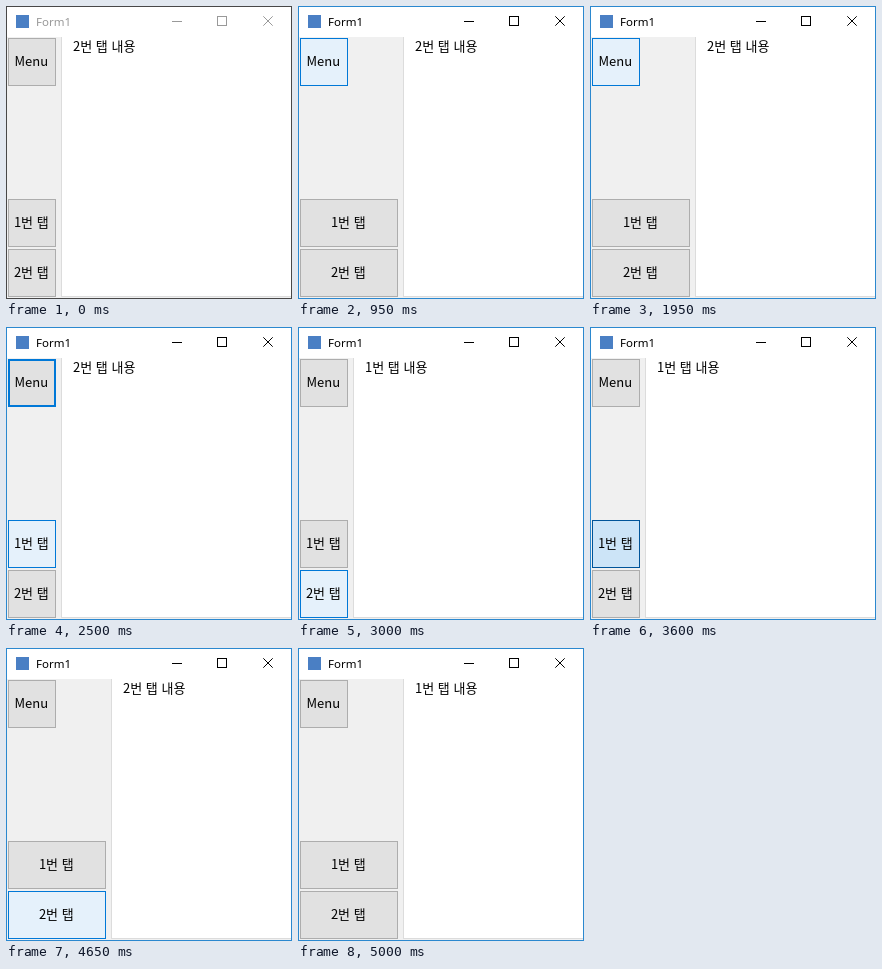
Write an HTML page that moves like this. It is 286 px wide and 293 px high and loops after 5.05 s.

```html
<!DOCTYPE html>
<html lang="ko">
<head>
<meta charset="utf-8">
<title>Form1</title>
<style>
  html, body { margin: 0; width: 100%; height: 100%; overflow: hidden; background: #fff; }
  svg { display: block; }
  text { font: 13px "Noto Sans CJK KR", "Noto Sans CJK", sans-serif; fill: #000; }
  #title { font: 11.5px "Noto Sans", "Noto Sans CJK KR", sans-serif; }
  .button text { text-anchor: middle; }
  .button rect { fill: #e1e1e1; stroke: #adadad; }
  .button .ring { fill: none; stroke: none; }
  .hover .face { fill: #e5f1fb; stroke: #0078d7; }
  .press .face { fill: #cce4f7; stroke: #005499; }
  .focus .face, .focus .ring { stroke: #0078d7; }
  #frame { fill: none; stroke: #2b88cf; }
  #controls { fill: none; stroke: #000; }
  .inactive #frame { stroke: #484848; }
  .inactive #controls { stroke: #999; }
  .inactive #title { fill: #999; }
</style>
</head>
<body>
<svg id="window" width="286" height="293" viewBox="0 0 286 293">
  <rect width="286" height="293" fill="#fff"/>
  <rect x="10" y="9" width="13" height="13" fill="#4a7fc4"/>
  <text id="title" x="30" y="20">Form1</text>
  <g id="controls">
    <path d="M166 15.5h10M211.5 10.5h9v9h-9z" shape-rendering="crispEdges"/>
    <path d="M257.3 10.3l9.4 9.4M266.7 10.3l-9.4 9.4"/>
  </g>
  <rect x="1" y="31" width="284" height="261" fill="#f0f0f0"/>
  <g id="page">
    <rect x="55" y="31" width="230" height="260" fill="#dcdcdc"/>
    <rect x="56" y="31" width="229" height="259" fill="#fff"/>
    <text id="content" x="67" y="45"></text>
  </g>
  <g id="buttons"></g>
  <rect id="frame" x=".5" y=".5" width="285" height="292"/>
</svg>
<script>
const LOOP = 5050;
const $ = id => document.getElementById(id);

// Each step lists only what changes; button looks are '', hover, press or focus.
const steps = [
  [0, { active: false, open: false, tab: 2, menu: '', tab1: '', tab2: '' }],
  [300, { menu: 'hover' }],
  [600, { menu: '' }],
  [750, { menu: 'hover' }],
  [850, { active: true }],
  [900, { menu: 'press' }],
  [950, { menu: 'hover', open: true }],
  [1350, { menu: 'press' }],
  [1400, { menu: 'hover', open: false }],
  [1600, { menu: 'focus' }],
  [1750, { menu: 'hover' }],
  [1900, { menu: 'press' }],
  [1950, { menu: 'hover', open: true }],
  [2250, { menu: 'press' }],
  [2300, { menu: 'hover', open: false }],
  [2450, { menu: 'focus' }],
  [2500, { tab1: 'hover' }],
  [2750, { menu: '', tab1: 'press' }],
  [2800, { tab1: 'hover', tab: 1 }],
  [3000, { tab1: '', tab2: 'hover' }],
  [3150, { tab2: 'press' }],
  [3200, { tab2: 'hover', tab: 2 }],
  [3350, { tab2: '', tab1: 'hover' }],
  [3600, { tab1: 'press', tab: 1 }],
  [3700, { tab1: '', menu: 'hover' }],
  [3850, { menu: 'press' }],
  [3900, { menu: 'hover', open: true }],
  [4100, { menu: 'focus' }],
  [4150, { tab1: 'hover' }],
  [4300, { menu: '', tab1: 'press' }],
  [4350, { tab1: 'hover' }],
  [4450, { tab1: '', tab2: 'hover' }],
  [4600, { tab2: 'press' }],
  [4650, { tab2: 'hover', tab: 2 }],
  [4750, { tab2: '', tab1: 'hover' }],
  [4900, { tab1: 'press' }],
  [4950, { tab1: 'hover', tab: 1 }],
  [5000, { tab1: '' }]
];

function makeButton(name, label, y) {
  $('buttons').insertAdjacentHTML('beforeend', `<g id="${name}" class="button">
    <rect class="face" x="2.5" y="${y + .5}" width="47" height="47"/>
    <rect class="ring" x="3.5" y="${y + 1.5}" width="45" height="45"/>
    <text x="25.3" y="${y + 28}">${label}</text></g>`);
}

function setWidth(name, width) {
  const [face, ring, label] = $(name).children;
  face.setAttribute('width', width - 1);
  ring.setAttribute('width', width - 3);
  label.setAttribute('x', width / 2 + 1.3);
}

function render(state) {
  $('window').setAttribute('class', state.active ? '' : 'inactive');
  $('page').setAttribute('transform', `translate(${state.open ? 50 : 0} 0)`);
  $('content').textContent = `${state.tab}번 탭 내용`;
  for (const name of ['menu', 'tab1', 'tab2'])
    $(name).setAttribute('class', `button ${state[name]}`);
  for (const name of ['tab1', 'tab2'])
    setWidth(name, state.open ? 98 : 48);
}

makeButton('menu', 'Menu', 32);
makeButton('tab1', '1번 탭', 193);
makeButton('tab2', '2번 탭', 243);

const start = performance.now();
function tick() {
  const time = (performance.now() - start) % LOOP;
  const past = steps.filter(([at]) => at <= time);
  render(Object.assign({}, ...past.map(([, change]) => change)));
  requestAnimationFrame(tick);
}
tick();
</script>
</body>
</html>
```
